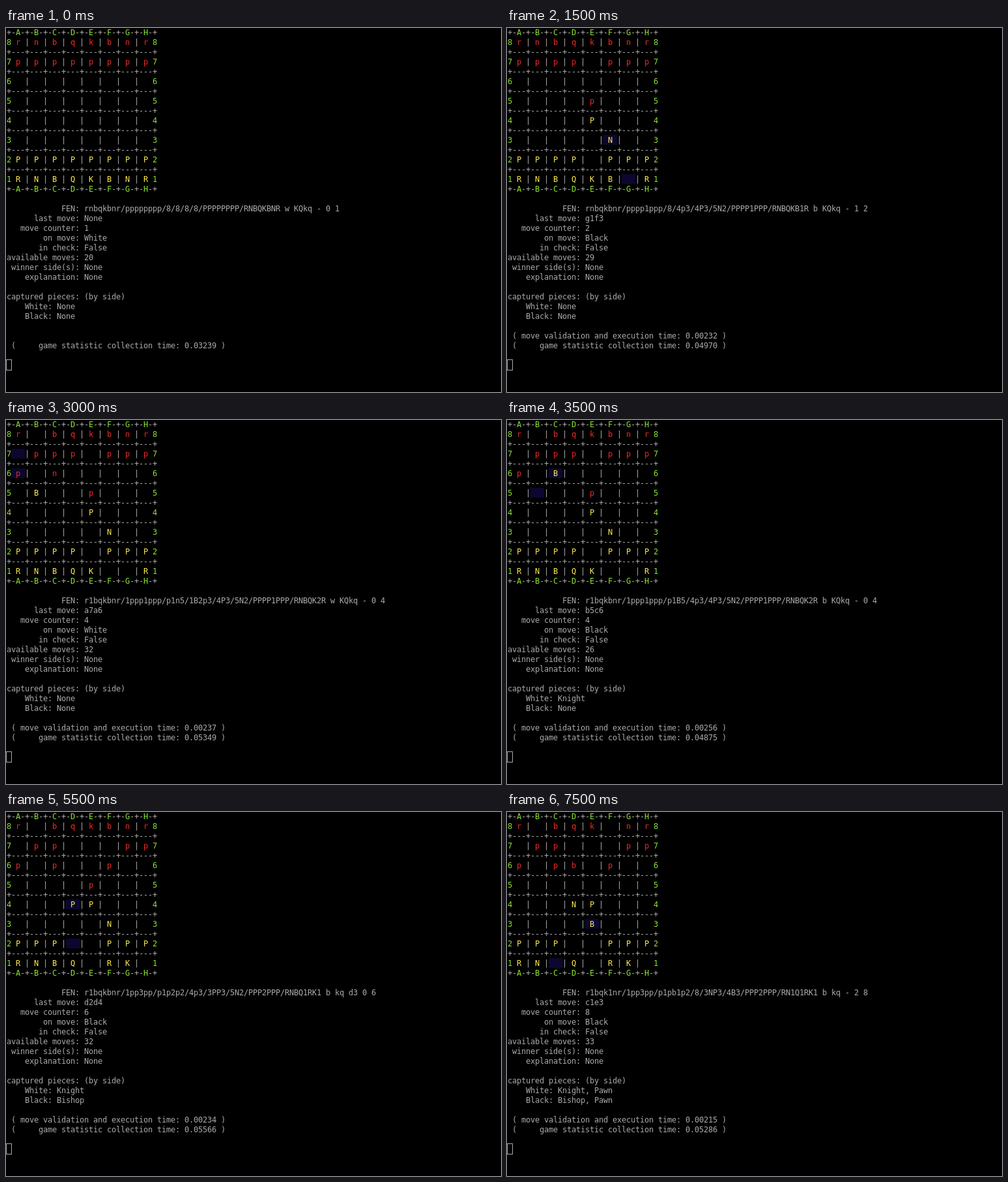
These frames come from a looping animation (760x558 px, 8000 ms). An HTML page:

```html
<!DOCTYPE html>
<html lang="en">
<head>
<meta charset="utf-8">
<title>Terminal chess</title>
<style>
html, body { margin: 0; width: 100%; height: 100%; overflow: hidden; background: #000; }
pre {
  position: absolute; left: 1px; top: 0; margin: 0;
  font: 12px/15px "DejaVu Sans Mono", monospace;
  letter-spacing: calc(7px - 1ch);
  font-variant-ligatures: none;
  color: #aaa;
}
.label { color: #8ae234; }
.white { color: #fce94f; }
.black { color: #ef2929; }
.moved { background: #0b0730; padding-top: 1px; }
#cursor {
  position: absolute; left: 0; top: 508px; width: 9px; height: 17px;
  box-sizing: border-box; border: 1px solid #aaa;
}
</style>
</head>
<body>
<pre id="screen"></pre>
<div id="cursor"></div>
<script>
const STEP = 500;
const FILES = "ABCDEFGH";
const NAMES = { p: "Pawn", n: "Knight", b: "Bishop", r: "Rook", q: "Queen" };

// move, available replies, execution time, statistics time
const MOVES = `
  e2e4 20 0.00228 0.03417
  e7e5 29 0.00231 0.04836
  g1f3 29 0.00232 0.04970
  b8c6 27 0.00245 0.04812
  f1b5 30 0.00262 0.05285
  a7a6 32 0.00237 0.05349
  b5c6 26 0.00256 0.04875
  d7c6 25 0.00249 0.04608
  e1g1 37 0.00321 0.05886
  f7f6 23 0.00226 0.04581
  d2d4 32 0.00234 0.05566
  e5d4 32 0.00251 0.05492
  f3d4 31 0.00248 0.05327
  f8d6 37 0.00239 0.05914
  c1e3 33 0.00215 0.05286`.trim().split("\n").map(line => line.trim().split(" "));

const paint = (kind, text) => `<span class="${kind}">${text}</span>`;
const square = name => (8 - name[1]) * 8 + FILES.toLowerCase().indexOf(name[0]);
const isWhite = piece => piece < "a";

function play(state, [move, replies, runTime, statTime]) {
  const board = [...state.board];
  const from = square(move), to = square(move.slice(2));
  const piece = board[from], taken = board[to];
  const kind = piece.toLowerCase();
  const white = isWhite(piece);
  const captured = { ...state.captured };
  let { castling } = state;

  if (taken !== " ") {
    const side = white ? "White" : "Black";
    captured[side] = [...captured[side], NAMES[taken.toLowerCase()]];
  }
  board[to] = piece;
  board[from] = " ";
  if (kind === "k") {
    castling = castling.replace(white ? /[KQ]/g : /[kq]/g, "");
    if (to - from === 2) {
      board[to - 1] = board[to + 1];
      board[to + 1] = " ";
    }
  }
  const doubleStep = kind === "p" && Math.abs(to - from) === 16;
  return {
    board, captured, castling, move, replies, runTime, statTime,
    moved: [from, to],
    turn: white ? "Black" : "White",
    passant: doubleStep ? move[0] + (white ? 3 : 6) : "-",
    quiet: kind === "p" || taken !== " " ? 0 : state.quiet + 1,
    count: state.count + !white
  };
}

const states = [{
  board: [..."rnbqkbnr" + "p".repeat(8) + " ".repeat(32) + "P".repeat(8) + "RNBQKBNR"],
  captured: { White: [], Black: [] },
  castling: "KQkq", move: "None", replies: 20, statTime: "0.03239",
  moved: [], turn: "White", passant: "-", quiet: 0, count: 1
}];
for (const entry of MOVES) states.push(play(states.at(-1), entry));

function fen(s) {
  const rows = s.board.join("").match(/.{8}/g).join("/").replace(/ +/g, gap => gap.length);
  return [rows, s.turn[0].toLowerCase(), s.castling, s.passant, s.quiet, s.count].join(" ");
}

function drawBoard(s) {
  const edge = "+" + [...FILES].map(f => `-${paint("label", f)}-+`).join("");
  const cell = (piece, i) => {
    const text = piece === " " ? "   " : paint(isWhite(piece) ? "white" : "black", ` ${piece} `);
    return s.moved.includes(i) ? paint("moved", text) : text;
  };
  const cells = s.board.map(cell);
  const ranks = [8, 7, 6, 5, 4, 3, 2, 1].map((n, r) => {
    const label = paint("label", n);
    return label + cells.slice(r * 8, r * 8 + 8).join("|") + label;
  });
  return [edge, ranks.join("\n" + "+---".repeat(8) + "+\n"), edge].join("\n");
}

function drawScreen(s) {
  const field = (name, value) => `${name.padStart(15)}: ${value}`;
  const timing = (name, value) => ` ( ${name.padStart(34)}: ${value} )`;
  const taken = side => `    ${side}: ${s.captured[side].join(", ") || "None"}`;
  return [
    drawBoard(s),
    "",
    field("FEN", fen(s)),
    field("last move", s.move),
    field("move counter", s.count),
    field("on move", s.turn),
    field("in check", "False"),
    field("available moves", s.replies),
    field("winner side(s)", "None"),
    field("explanation", "None"),
    "",
    "captured pieces: (by side)",
    taken("White"),
    taken("Black"),
    "",
    s.runTime ? timing("move validation and execution time", s.runTime) : "",
    timing("game statistic collection time", s.statTime)
  ].join("\n");
}

const screens = states.map(drawScreen);
const output = document.getElementById("screen");
const start = performance.now();
let shown = -1;

function tick() {
  const index = Math.floor((performance.now() - start) / STEP) % screens.length;
  if (index !== shown) output.innerHTML = screens[shown = index];
  requestAnimationFrame(tick);
}
tick();
</script>
</body>
</html>
```
